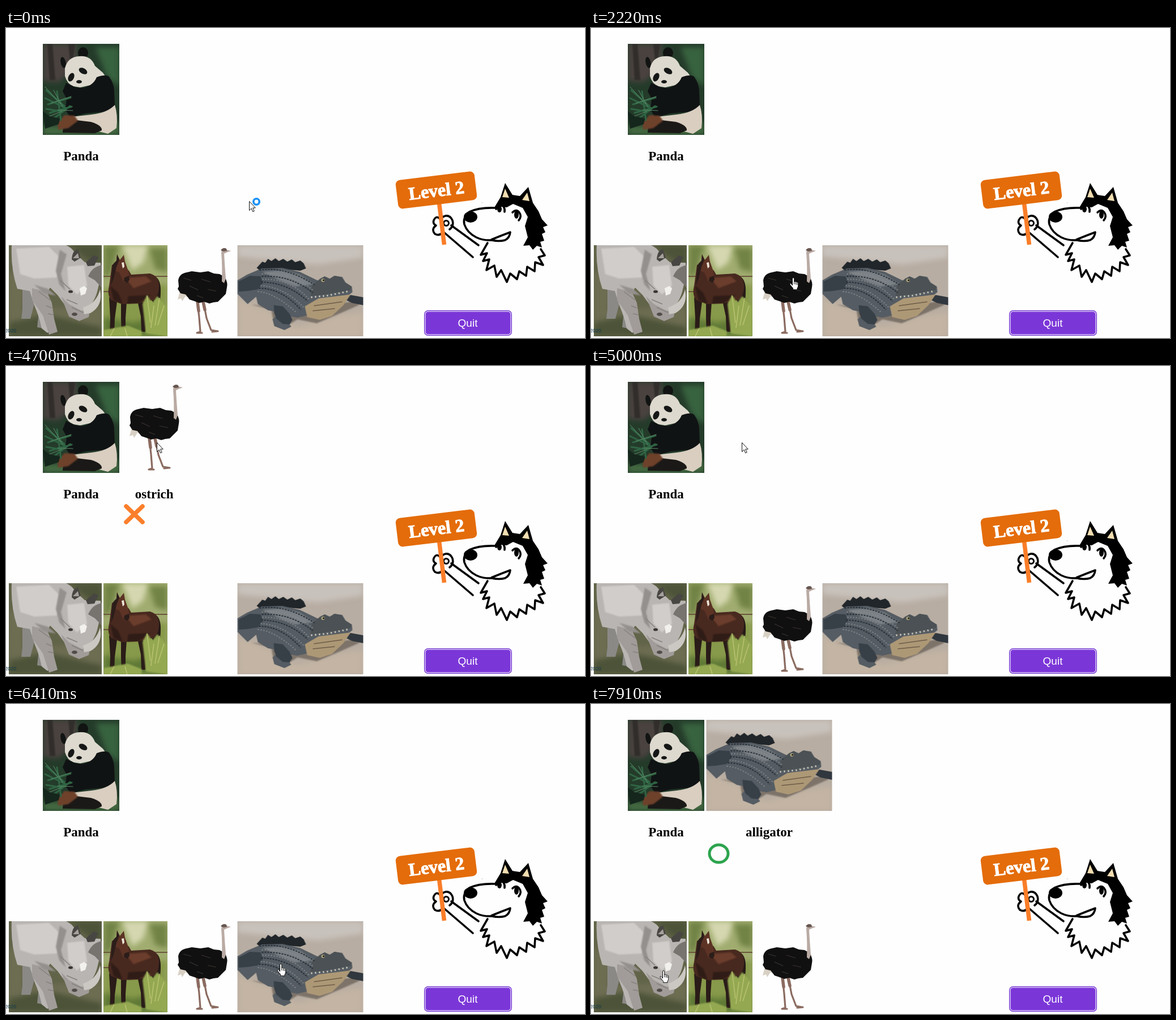
An HTML page for the animation above (8 s loop, 1022 px wide and 548 px high).

```html
<!DOCTYPE html>
<html lang="en">
<head>
<meta charset="utf-8">
<title>Animal matching game</title>
<style>
html, body { margin: 0; width: 100%; height: 100%; overflow: hidden; background: #fefefe; }
#stage { display: block; width: 1022px; height: 548px; }
.label { font: bold 23px "Liberation Serif", "Times New Roman", serif; text-anchor: middle; fill: #000; }
.quit { font: 19px "Liberation Sans", Arial, sans-serif; text-anchor: middle; fill: #fff; }
.level { font: bold 32px "Liberation Serif", "Times New Roman", serif; text-anchor: middle; fill: #fff; stroke: #fff; }
.year { font: 9px "Liberation Sans", Arial, sans-serif; fill: #10384a; }
.ink { fill: none; stroke: #000; stroke-width: 3.6; stroke-linecap: round; stroke-linejoin: round; }
.soft { filter: blur(5px); }
.haze { filter: blur(1.2px); }

.timed { animation: 8s step-end infinite; }
#cursor { animation-name: move; }
#spinner { animation-name: busy; }
#arrow { animation-name: arrow; }
#hand { animation-name: hand; }
#wrong { animation-name: wrong; }
#ostrichHome { animation-name: ostrichHome; }
#right { animation-name: right; }
#gatorHome { animation-name: gatorHome; }

@keyframes busy { 0% { opacity: 1 } 4.625%, 100% { opacity: 0 } }
@keyframes arrow { 0%, 52.25% { opacity: 1 } 22.8125%, 70.625%, 100% { opacity: 0 } }
@keyframes hand { 0%, 52.25% { opacity: 0 } 22.8125%, 70.625%, 100% { opacity: 1 } }
@keyframes wrong { 0%, 62.5%, 100% { opacity: 0 } 38.875% { opacity: 1 } }
@keyframes ostrichHome { 0%, 62.5%, 100% { opacity: 1 } 38.875% { opacity: 0 } }
@keyframes right { 0% { opacity: 0 } 83.625%, 100% { opacity: 1 } }
@keyframes gatorHome { 0% { opacity: 1 } 83.625%, 100% { opacity: 0 } }
@keyframes move {
  0% { transform: translate(429px, 306px) }
  19.375% { transform: translate(429px, 307px) }
  21.25% { transform: translate(371px, 381px) }
  22.8125% { transform: translate(357px, 399px) }
  24.375% { transform: translate(348px, 430px) }
  26.25% { transform: translate(350px, 437px) }
  27.75% { transform: translate(350px, 441px) }
  52.25% { transform: translate(315px, 312px) }
  53.75% { transform: translate(284px, 205px) }
  55.25% { transform: translate(279px, 175px) }
  57.125% { transform: translate(271px, 148px) }
  58.75% { transform: translate(266px, 135px) }
  67.25% { transform: translate(354px, 245px) }
  69.125% { transform: translate(385px, 383px) }
  70.625% { transform: translate(430px, 408px) }
  72.125% { transform: translate(452px, 434px) }
  74% { transform: translate(465px, 447px) }
  75.5% { transform: translate(478px, 459px) }
  88.625% { transform: translate(290px, 491px) }
  90.125% { transform: translate(266px, 483px) }
  91.625% { transform: translate(268px, 476px) }
  93.5% { transform: translate(263px, 476px) }
  95.375% { transform: translate(236px, 474px) }
  97.25% { transform: translate(170px, 473px) }
  98.875%, 100% { transform: translate(121px, 471px) }
}
</style>
</head>
<body>
<svg id="stage" viewBox="0 0 1022 548">
<defs>
  <symbol id="ostrich" viewBox="0 0 116 161">
    <g fill="none" stroke="#8b6b60" stroke-linejoin="round" stroke-linecap="round">
      <path stroke-width="5.500" d="M49 100l2 16M59 100l3 14"/>
      <path stroke-width="3.200" d="M50 110l2 18 2 25-6 2h9M61 108l4 21 8 21 12 2-10 1"/>
    </g>
    <path fill="#d8d0c4" d="M20 74l-6 22 6-2 2 5 6-9 7 3 2-14z"/>
    <path fill="#111010" d="M15 62q2-12 15-14l9-2 15 2 14-2 10 4 10 1 9 5q6 10 4 18l-2 12-7 7-7 7-8 1-7 2-9-3-9 2-8-3-9-3-7-9-9-2-5-8 2-4z"/>
    <path fill="none" stroke="#383431" stroke-width="1.200" d="M24 58l14 4M35 72l15 7M56 60l16 5M67 78l15 3M48 89l11 4"/>
    <path fill="#b9aaa3" d="M92 64q1-28-1-50 0-9 9-6l8 2-8 3-4 2q1 20 3 44l-3 8z"/>
    <path fill="#675650" d="M90 9q4-6 10-3l1 4-6 1z"/>
  </symbol>

  <symbol id="gator" viewBox="0 0 222 161">
    <path fill="#b8ada2" d="M0 0h222v161H0z"/>
    <path class="soft" fill="#c8c2bc" d="M0 0h222v22l-80 12L0 20z"/>
    <path class="soft" fill="#c3b4a3" d="M0 95l55 20 50 29 70-20 47-6v43H0z"/>
    <path class="haze" fill="#7d7369" d="M25 105l35 9 3 18 29 8 14-9 34 7 40-17 36-16-10-6-96 15z"/>
    <path fill="#20262a" d="M34 40l10-11 5 2 5-7 6 4 7-5 6 5 8-4 7 5 8-4 6 5 9-3 6 5 4 9-10 4-35-3-35 4z"/>
    <path fill="#30373e" d="M186 94l14-6 22 4v14l-20-4z"/>
    <path fill="#555c63" d="M0 62l17-10 26-11 36-1 31 7 35 17 9-9 9 4 9-5 13 2 6 10 11 7 1 10-9 7-46 18-20 15-22 5-12-2-4 11 5 7-12 6-18-7-3-12 13-12-21-4-18-11-3-13-15 13L0 86z"/>
    <path class="haze" fill="#7a8085" d="M44 47l36-3 30 8 26 17-34 4-30-12z"/>
    <path fill="#373f47" d="M2 64l20-10 19 1 4 12-9 11-19 3-15 1zM64 106l16 2 12 13 5 11-5 8-12-1-11-9-4-10z"/>
    <path fill="#ad9876" d="M119 108l24-14 57-7-13 19-20 19-22 7-22-5z"/>
    <path fill="#4b5154" d="M132 71l14-12 8-4 8 5 9-6 13 3 5 8 12 8v6l-28 5-24 4-20 2z"/>
    <g fill="none">
      <path stroke="#868c8d" stroke-width="2" stroke-dasharray="2 3" d="M43 51q51-6 92 30M44 60q49-1 82 35M41 71q42 3 76 39M36 82q28 1 67 36"/>
      <path stroke="#242c33" stroke-width="2" stroke-dasharray="3 2" d="M39 44q47-7 97 26M43 55q50-3 90 29M42 65q47 1 82 34M38 76q40 0 74 38"/>
      <path stroke="#e3dbc7" stroke-width="3" stroke-dasharray="2 5" d="M130 92l29-3 39-8"/>
      <path stroke="#6d5b48" stroke-width="1.500" d="M135 107l50-7M133 116l39-4"/>
    </g>
    <circle cx="151" cy="62" r="3" fill="#b3aa82"/>
    <circle cx="152" cy="62" r="1.400"/>
  </symbol>
</defs>

<!-- panda -->
<svg x="65" y="28" width="135" height="161" viewBox="0 0 135 161">
  <path fill="#243b2a" d="M0 0h135v161H0z"/>
  <path class="soft" fill="#4a423f" d="M0 0h60v40L28 68 0 66z"/>
  <path class="soft" fill="#38633f" d="M93 6h42v69l-22-17z"/>
  <path class="haze" fill="#302d2b" d="M8 0h9l5 64H12zM45 0h12l-7 48z"/>
  <path class="soft" fill="#456b42" d="M83 148l52-10v23H0v-17z"/>
  <g fill="#111412">
    <ellipse cx="36" cy="33" rx="4.500" ry="10" transform="rotate(-12 36 33)"/>
    <ellipse cx="71" cy="16" rx="9" ry="10"/>
  </g>
  <path fill="#ddd9ce" d="M39 43q5-20 25-21 21-2 28 17l14 12 10 14q-20-4-32 8l-18 4-12-2q-11-4-15-18z"/>
  <path fill="#101314" d="M41 69l17 8 13 1q18-4 24-19 16-6 22-1 9 13 9 26l1 24q-8 12-18 12l-33 3-28 7-8-14 2-19-7-13z"/>
  <path fill="#d9cec0" d="M51 129l35-4q28-3 41-17 6 18 3 41l-15 10-19-5-17-15-28-3z"/>
  <path fill="#1b1917" d="M36 145l24-10 25 3q20 6 19 15l-12 5-57-1z"/>
  <path class="haze" fill="#6e412b" d="M26 140l12-14 18 1 6 9-17 13-18 3z"/>
  <g fill="#151716">
    <ellipse cx="50" cy="59" rx="5" ry="8" transform="rotate(25 50 59)"/>
    <ellipse cx="71" cy="48" rx="8" ry="5" transform="rotate(29 71 48)"/>
    <ellipse cx="64" cy="67" rx="5" ry="3"/>
  </g>
  <g fill="none" stroke="#2f6443" stroke-width="3" stroke-linecap="round">
    <path d="M6 82l32 28M9 107l40-12M12 122l39-11M25 84l7 51M4 96l37 18M14 136l34-26M6 115l29 5"/>
    <path stroke="#5d8d6b" stroke-width="1" d="M4 76l28 31M14 105l36-12M26 117l27 1M9 129l25-10M19 82l16 29"/>
  </g>
  <path fill="#15261d" d="M0 119l12 9 18 4-2 10-24 8z"/>
</svg>

<!-- rhino -->
<svg x="5" y="384" width="164" height="161" viewBox="0 0 164 161">
  <path fill="#626449" d="M0 0h164v161H0z"/>
  <path class="soft" fill="#6d6d52" d="M0 48h32l-8 66 140-5v52H0z"/>
  <path class="soft" fill="#4c5338" d="M105 0h59v43zM0 137l65-14 99 22v16H0z"/>
  <path fill="#8b8986" d="M24 77h25l-4 27-7 26H22l2-16zM53 118l16 8-2 22-17-3z"/>
  <path fill="#b9b5b2" d="M5 0h96q10 4 16 14l17 16 28 1q2 20-5 47-5 24-22 36l-16 8-17-12-16-22-13-13q-8 9 0 34l10 37-15 9-10-8q-4-20-12-38l-9-28-22-4Q3 42 5 0z"/>
  <path fill="#a19c99" d="M41 76l26 6 9 20 4 28 6 23-15 5-11-34-19-27zM92 90l14 14 23 12 15-5-3 16-17 7-18-8z"/>
  <path class="haze" fill="#d0cdca" d="M13 6l58-3 24 23-10 31-40 2-25-8zM103 38l30-3 5 37-18 15-15-16z"/>
  <path class="haze" fill="#94908d" d="M90 8l12 8-10 35 8 30-11-12-6-24zM45 70l24 7 14 12-21-4z"/>
  <path fill="#484642" d="M111 25q1-16 11-18l5 15-11 7zM136 30l14-12 8 3-7 15-12 1z"/>
  <path fill="#a6a09d" d="M113 23l9-9 2 9z"/>
  <path fill="#77736f" d="M140 55q7-17 24-20v40l-12-13z"/>
  <path fill="#cbc7c2" d="M131 110q24-7 30-32 6 29-17 42l-11 2z"/>
  <path fill="#f2f1ee" d="M125 76l8-4 5 4-3 10-8 3z"/>
  <ellipse cx="109" cy="82" rx="4" ry="2.500" fill="#383630"/>
  <ellipse cx="116" cy="122" rx="5" ry="3" fill="#514c49"/>
  <path fill="none" stroke="#85817d" stroke-width="1.500" d="M91 62l17 16M102 96l19 8M111 110l20 9M53 82l20 15M66 107l10 4M69 121l10 2"/>
</svg>

<!-- horse -->
<svg x="172" y="384" width="113" height="161" viewBox="0 0 113 161">
  <path fill="#a1ad70" d="M0 0h113v161H0z"/>
  <path class="soft" fill="#d5d7b0" d="M33 0h46l-9 31-19 13z"/>
  <path class="soft" fill="#718345" d="M0 0h28L13 52 0 58zM81 5h32v43l-22-6z"/>
  <path class="soft" fill="#87994a" d="M0 77l113-8v92H0z"/>
  <path class="soft" fill="#5f7936" d="M0 127l52 10 61-15v39H0z"/>
  <path stroke="#6a563b" stroke-width="2" d="M0 55h113M0 82h22"/>
  <path fill="#251a17" d="M88 54q14 4 13 29 0 22-10 32l-3-22z"/>
  <path fill="#2a1c18" d="M10 92l14 8-4 30-1 29h-8l1-30zM31 98l10 3-2 28v30h-7l-1-30zM60 98l12 4 3 25-1 26h-7l-1-27zM83 93l12-8-3 24z"/>
  <path fill="#48291f" d="M15 35l12-6 18 16 4 7 33-2q15 4 16 20 1 20-11 27l-27 6-28 1-18-7Q6 88 10 72z"/>
  <path class="haze" fill="#6b3d2c" d="M39 58l36-3 10 9-32 12z"/>
  <path class="haze" fill="#2f1c17" d="M12 72l14 12 8 19-16-6zM44 90l40-2-22 14-20 1z"/>
  <path fill="#5c3325" d="M18 32l5-4 1-12 5 10 7-9 2 12 6 17 2 13-4 8-7-3-7-16-9-3z"/>
  <path fill="#2b1d1a" d="M16 35l7-8 1-11 4 10-5 12-5 21-5 12zM37 57l8-3 1 7-4 6-6-4z"/>
  <path fill="#efe6d8" d="M32 31l4-1 1 8-3 3z"/>
  <path class="haze" fill="#94a851" d="M69 104l8-16 9 14 9-12 18 20v51l-38-5zM0 150l43-8 25 10-1 9H0z"/>
  <path fill="none" stroke="#bac372" stroke-width="1.500" d="M77 89l6 48M89 107l-5 39M99 93l-8 49M107 107l-11 34M12 161l7-14M42 161l-4-14"/>
</svg>

<g id="ostrichHome" class="timed"><use href="#ostrich" x="289" y="384" width="116" height="161"/></g>
<g id="gatorHome" class="timed"><use href="#gator" x="408.500" y="384" width="222" height="161"/></g>
<text class="year" x="-2" y="538">2020</text>

<text class="label" x="132.500" y="234">Panda</text>
<g id="wrong" class="timed">
  <use href="#ostrich" x="204" y="28" width="116" height="161"/>
  <text class="label" x="261.700" y="234">ostrich</text>
  <path d="M212 248l29 28m0-28l-29 28" stroke="#fa7f2c" stroke-width="7.500" stroke-linecap="round"/>
</g>
<g id="right" class="timed">
  <use href="#gator" x="203.500" y="28" width="222" height="161"/>
  <text class="label" x="314.500" y="234">alligator</text>
  <ellipse cx="225.500" cy="264.500" rx="16.500" ry="15.500" fill="none" stroke="#2da44e" stroke-width="5"/>
</g>

<!-- husky with sign -->
<g class="ink">
  <path d="M786 349l48 35M774 362l50 43"/>
  <path d="M783 356q8-6 5-16-4-9-12-8-8 2-8 8-8-11-13 0-2 6 4 9-9 7-2 15 9 5 15-5"/>
  <circle cx="777" cy="345" r="4.500" stroke-width="3"/>
</g>
<path d="M764.500 309l9 74" stroke="#fa7d28" stroke-width="7.500"/>
<g transform="rotate(-7 759.500 286.500)">
  <rect x="689.500" y="261" width="140" height="51" rx="8" fill="#e46c0a"/>
  <text class="level" x="759.500" y="298">Level 2</text>
</g>
<path class="ink" d="M850 380l-12 21 11-3-7 14 11-3-5 19 14-8 4 20 8-12 10 21 6-15 12 10 4-14 12 8 2-16 13 8 1-16 14 5-8-14 11-3-7-11"/>
<path d="M861 319l12-20 8-25 13 21 13 2 15-16 8 28 10 15 6 14 10 11-8 3 4 9-6 3 4 12-7 2 3 10-9-3-7 7-6-8-11 1 8-15-5-20 5-16-9-16-17-7-11 6-10-1z"/>
<path fill="#f1ddb0" d="M881 284l7 16-12-1zM920 291l4 15-13-2z"/>
<path class="ink" fill="#fefefe" d="M863 318q-28-1-45 7-12 10-9 22 5 15 21 23 12 6 28 5"/>
<path class="ink" d="M857 374q17-7 33-13-1 10-9 14-10 3-24 0"/>
<ellipse cx="820" cy="334" rx="12" ry="10"/>
<path class="ink" d="M865 320q6-9 13-5 3 5 2 10M894 326q7-7 12 0 5 7-1 14"/>
<ellipse cx="871" cy="320" rx="4" ry="6"/>
<ellipse cx="901" cy="330" rx="4" ry="7"/>
<circle cx="840.500" cy="309" r=".7" fill="#aaa"/>

<!-- quit button -->
<rect x="738" y="499" width="155" height="45" rx="7" fill="#7134d1"/>
<rect x="740" y="501" width="151" height="41" rx="5" fill="#7b36d8" stroke="#d9c6f6" stroke-width="1.500"/>
<text class="quit" x="815" y="528">Quit</text>

<g id="spinner" class="timed"><circle cx="442" cy="307" r="5.200" fill="#fff" stroke="#1b91f5" stroke-width="3.600"/></g>
<g id="cursor" class="timed" fill="#fff" stroke="#111" stroke-width="1" stroke-linejoin="round">
  <path id="arrow" class="timed" d="M.5.5v16l3.700-3.500 2.500 5.800 2.500-1.100-2.500-5.700h4.600z"/>
  <g id="hand" class="timed">
    <path d="M5.500 14V2.200q0-1.700 1.600-1.700t1.600 1.700V8q0-1 1.400-.9t1.400 1.400q.2-.8 1.300-.6t1.200 1.400q.2-.8 1.100-.5.600.3.600 1.500v4.500q0 2.500-1.700 4.200v2.500H6.700v-2.200l-4.500-5.500Q.4 11.600 1.200 10.700q1-1 2.400.6z"/>
    <path fill="none" d="M8.700 8v4M11.500 9v3.500M13.800 10v3"/>
  </g>
</g>
</svg>
</body>
</html>
```
